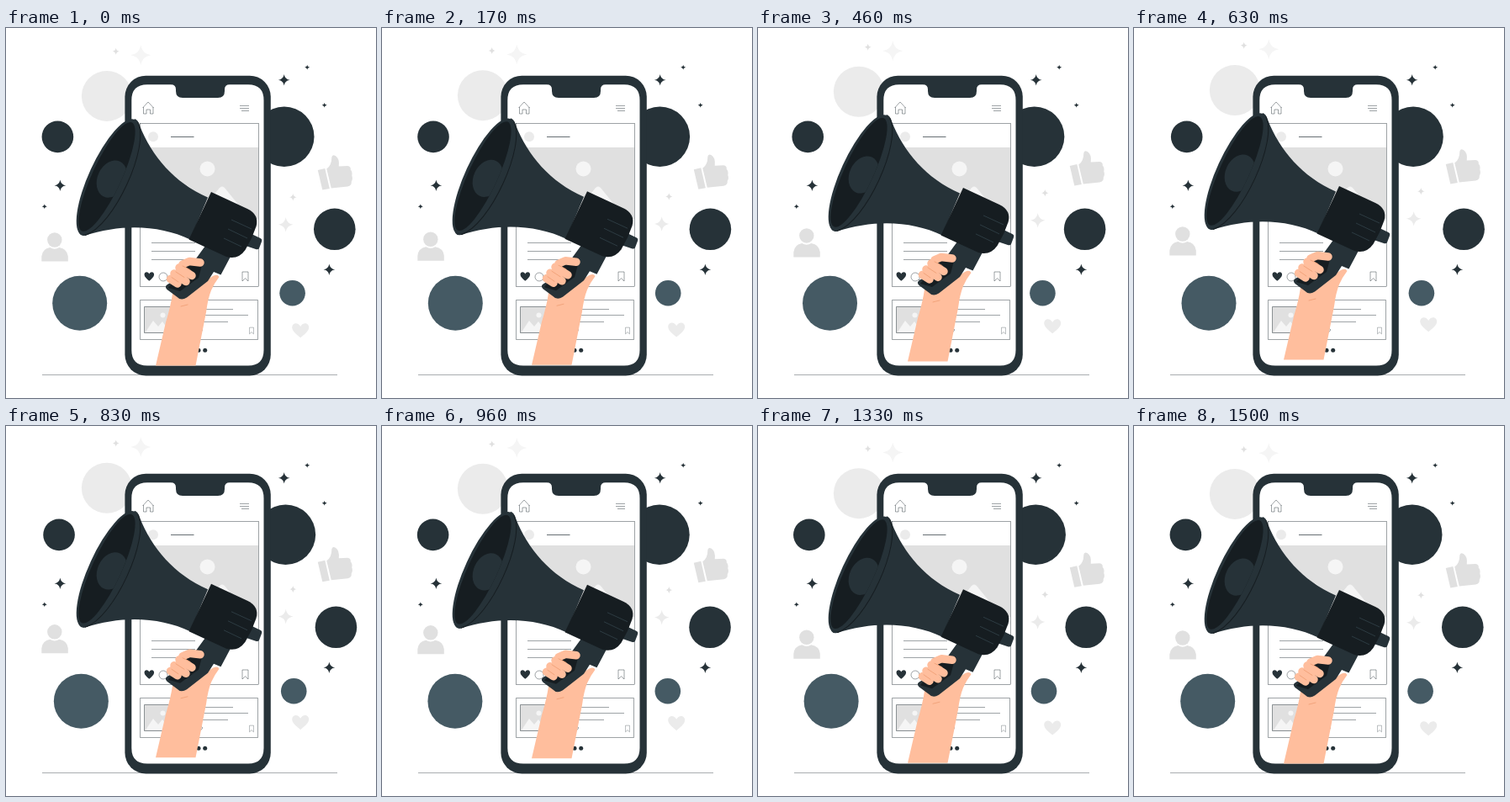
Recreate the animation shown at these times as an HTML page. Size 440 px wide and 440 px high, loop 1540 ms.

```html
<!DOCTYPE html>
<html lang="en">
<head>
<meta charset="utf-8">
<title>Megaphone and phone</title>
<style>
html, body { margin: 0; width: 100%; height: 100%; overflow: hidden; background: #fff; }
svg { display: block; width: 100vw; height: 100vh; }
.ink { fill: #263238; }
.deep { fill: #161d21; }
.slate { fill: #455a64; }
.grey { fill: #e0e0e0; }
.pale { fill: #ebebeb; }
.faint { fill: #f5f5f5; }
.skin { fill: #ffbe9d; }
.thin { fill: none; stroke: #263238; stroke-width: .45; }
.finger { fill: none; stroke: #ffbe9d; stroke-width: 9.5; stroke-linecap: round; stroke-linejoin: round; }
.crease { fill: none; stroke: #eb996e; stroke-width: .7; stroke-linecap: round; }
</style>
</head>
<body>
<svg viewBox="0 0 440 440">
  <defs>
    <path id="star" d="M0-1C.14-.38.38-.14 1 0 .38.14.14.38 0 1-.14.38-.38.14-1 0-.38-.14-.14-.38 0-1Z"/>
    <path id="heart" d="M0 .9C-.5.45-1 .05-1-.4-1-1-.25-1.1 0-.5.25-1.1 1-1 1-.4 1 .05.5.45 0 .9Z"/>
    <path id="mark" d="M-3.5-5.5h7v11L0 2.2l-3.5 3.3Z"/>
    <clipPath id="mouth"><ellipse cx="-1.5" rx="17.5" ry="71"/></clipPath>
  </defs>

  <path d="M43 412.5H394" stroke="#263238" stroke-width=".4"/>

  <g class="float">
    <circle class="pale" cx="119.9" cy="80.9" r="30"/>
    <use href="#star" class="grey" transform="translate(130.7 27.8) scale(4)"/>
    <use href="#star" class="faint" transform="translate(160.3 32.3) scale(12)"/>
    <use href="#star" class="pale" transform="translate(332.7 233.8) scale(8.8)"/>
    <use href="#star" class="grey" transform="translate(341.3 201.3) scale(4.2)"/>
    <use href="#heart" class="pale" transform="translate(350.2 359.8) scale(10 9.5)"/>
    <g class="grey" transform="translate(.3 .5)">
      <circle cx="57.5" cy="251.5" r="8.7"/>
      <path d="M42 277V271Q43 262 52 260.5Q57.5 264 63 260.5Q72.5 262 73.5 271V277Z"/>
      <path d="M370.5 168.5 379 166.5 384.5 190.5 376 192Z"/>
      <path d="M381 167Q387 163 387 153.5 387.5 149.5 391.5 151.5 396.5 154.5 395.5 164L406 163.5Q410 164 409.5 168 412 171 411 175 412.5 179 410.5 182 411 187 406 188L386.5 190Z"/>
    </g>
  </g>

  <g class="ink">
    <use href="#star" transform="translate(64.4 187.3) scale(6.8)"/>
    <use href="#star" transform="translate(45.8 212.2) scale(3)"/>
    <use href="#star" transform="translate(330.7 61.8) scale(6.8)"/>
    <use href="#star" transform="translate(358.2 46.8) scale(3)"/>
    <use href="#star" transform="translate(378.7 91.8) scale(3)"/>
    <use href="#star" transform="translate(384.4 287.3) scale(6.8)"/>
  </g>

  <g class="shake">
    <circle class="ink" cx="61.4" cy="129.4" r="18.8"/>
    <circle class="slate" cx="87.7" cy="327.3" r="32.5"/>
    <circle class="ink" cx="330.8" cy="129.2" r="35.7"/>
    <circle class="ink" cx="390.8" cy="239.3" r="24.8"/>
    <circle class="slate" cx="340.6" cy="315.2" r="15.3"/>
  </g>

  <!-- phone -->
  <rect class="ink" x="141.4" y="56.7" width="173.4" height="356.8" rx="25"/>
  <path fill="#fff" d="M168 67.3H196Q202 67.3 202 73V75Q202 83 210 83H252Q260 83 260 75V73Q260 67.3 266 67.3H288Q306.5 67.3 306.5 86V383Q306.5 401.5 288 401.500H168Q149.300 401.500 149.300 383V86Q149.300 67.300 168 67.300Z"/>
  <path class="thin" d="M162.500 95 169 88 175.500 95M163.500 94V102H167V97H171.500V102H175V94M278 92.500H289M278 95.500H289M280 98.500H289"/>
  <rect class="thin" x="159.500" y="113.500" width="141" height="194"/>
  <circle class="pale" cx="175" cy="129.300" r="6"/>
  <path d="M196 129.500H223.500" stroke="#263238" stroke-width=".7"/>
  <path class="grey" d="M160 142H300V227H160Z"/>
  <circle class="faint" cx="239.500" cy="167.500" r="9"/>
  <path class="faint" d="M180 227 212 188Q215 186 218 189L236 212 254 190Q257 187 260 190L290 227Z"/>
  <path class="thin" d="M173 255.500H225M173 265.500H225M173 275.500H222"/>
  <use href="#heart" class="ink" transform="translate(170.300 295.500) scale(5.800)"/>
  <path class="thin" d="M191 299A5 5 0 1 1 192 296L192 300ZM199 300V291H207"/>
  <use href="#mark" class="thin" x="284.500" y="295.500"/>
  <path class="thin" d="M159.500 370.500V323.500H299.500V370.500Z"/>
  <path class="grey" stroke="#263238" stroke-width=".5" d="M164.500 331.500H196.500V362.500H164.500Z"/>
  <circle class="faint" cx="186.500" cy="341.500" r="3"/>
  <path class="faint" d="M166 361.500 175 348 181 355 186 349 195 361.500Z"/>
  <path class="thin" d="M203 334.500H270M203 341.500H288M203 349.500H264"/>
  <use href="#heart" class="thin" transform="translate(231 360) scale(2.500)" style="stroke-width:.2"/>
  <use href="#mark" class="thin" transform="translate(292 360) scale(.7)"/>
  <circle class="ink" cx="229" cy="383.200" r="2.500"/>
  <circle class="ink" cx="236.700" cy="383.200" r="2.500"/>

  <!-- megaphone and hand -->
  <g class="float">
    <path class="skin" d="M178 401.500 190 350Q196 330 198 316L225 300 243 297Q251 291 253.500 296 248 303 244 312 240 322 238 338L225.500 401.500Z"/>
    <path class="ink" d="M240 255 268.500 269 255.500 293.500 247 290 240 301 215 320.500Q208 325 203 319.500L191.500 311Q188 307.500 192 305L213 292Z"/>
    <path class="deep" d="M222 274 235 275 229 297 207 313 193 309Z"/>
    <path class="finger" d="M210 281 218 277.500 231 279M206 285 221 294.500M200 292 214 301.500M195.500 298.500 204 304"/>
    <path class="crease" d="M210 283 219 287.500M202 290 212 296.500M197 296.500 205 302M208 331 216 329"/>

    <path class="ink" d="M153 108Q157 109 159 116C173 152 200 184 240 201.500L219 251.500C184 235 140 232 93 247Q85.500 248 86 236Z"/>
    <g transform="translate(121.300 177.500) rotate(24.700)">
      <ellipse class="ink" rx="22.500" ry="75.500"/>
      <path d="M5-74C30-55 31 50 4 74" fill="none" stroke="#161d21" stroke-width="1"/>
      <ellipse class="deep" cx="-1.500" rx="17.500" ry="71"/>
      <ellipse class="ink" cx="5" rx="17" ry="23" clip-path="url(#mouth)"/>
    </g>
    <path class="ink" d="M290 244 302.500 250Q305 251 304 254L301 262Q300 264 297 263L285 259Z"/>
    <path class="deep" d="M244 195 287 215Q301.500 222 297.500 236L292 250 284.500 264Q276 276 262 272L217.500 251.500Z"/>
    <path d="M268 228 292 239M264 239 287 250M259 250 280 260" fill="none" stroke="#33434b" stroke-width=".8"/>
  </g>
</svg>
<script>
const LOOP = 1540, CYCLE = 1500, FPS = 24;
const LIFT = 7.4, SWAY = 440 / 750;
const SWAYS = [0, -1, 2, -4, 4, -4, 4, -4, 2, -1, 0];

function bezier(x1, y1, x2, y2) {
  const at = (a, b, s) => 3 * a * s * (1 - s) ** 2 + 3 * b * s * s * (1 - s) + s ** 3;
  return x => {
    let lo = 0, hi = 1;
    for (let i = 0; i < 24; i++) {
      const mid = (lo + hi) / 2;
      if (at(x1, x2, mid) < x) lo = mid; else hi = mid;
    }
    return at(y1, y2, lo);
  };
}
const ease = bezier(.25, .1, .25, 1);
const easeInOut = bezier(.42, 0, .58, 1);

function sway(p) {
  const i = Math.min(9, Math.floor(p * 10));
  return SWAY * (SWAYS[i] + (SWAYS[i + 1] - SWAYS[i]) * ease(p * 10 - i));
}
const lift = p => -LIFT * easeInOut(1 - Math.abs(1 - 2 * p));

const floaters = document.querySelectorAll('.float');
const shaker = document.querySelector('.shake');

function draw(now) {
  // the motion advances in 24 fps steps, on a 10 ms clock
  const step = Math.floor((now % LOOP + 5) * FPS / 1000);
  const p = Math.min(1, step * 1000 / FPS / CYCLE);
  for (const el of floaters) el.setAttribute('transform', `translate(0 ${lift(p)})`);
  shaker.setAttribute('transform', `translate(${sway(p)} 0)`);
}
function tick() {
  draw(performance.now());
  requestAnimationFrame(tick);
}
tick();
</script>
</body>
</html>
```
